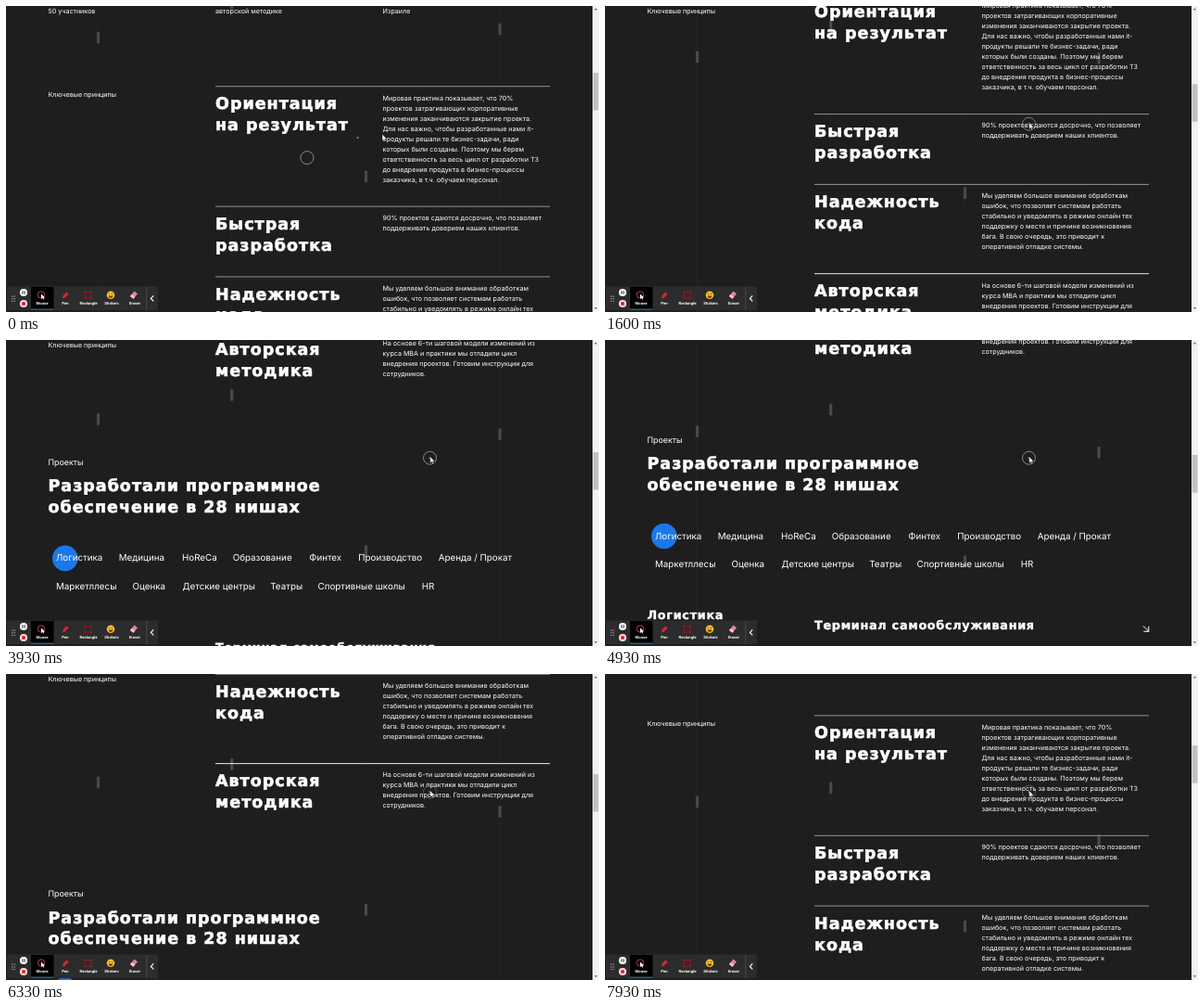
Write an HTML page that moves like this. It is 640 by 330 pixels and loops after 8 s.

```html
<!DOCTYPE html>
<html lang="ru">
<head>
<meta charset="utf-8">
<title>Ключевые принципы</title>
<style>
  html, body { margin: 0; width: 100%; height: 100%; overflow: hidden; background: #1e1e1e; }
  svg { display: block; width: 640px; height: 330px; }
  text { fill: #fff; text-rendering: geometricPrecision; }
  .body { font: 400 7.15px Inter, sans-serif; }
  .label { font: 400 8.9px Inter, sans-serif; }
  .chip { font: 400 9.8px Inter, sans-serif; }
  .title, .sub { font: 700 17.5px "DejaVu Sans", sans-serif; letter-spacing: 1px; stroke: #fff; stroke-width: .6px; }
  .sub { font-size: 12.8px; letter-spacing: .7px; stroke-width: .4px; }
  .tool { font: 700 4.2px Roboto, sans-serif; text-anchor: middle; }
</style>
</head>
<body>
<svg viewBox="0 0 640 330">
  <rect width="640" height="330" fill="#1e1e1e"/>
  <g id="rails"></g>
  <g id="page"></g>
  <text id="sticky" class="body" x="45.5">Ключевые принципы</text>

  <circle id="ring" r="7" fill="none" stroke="#b4b4b4" stroke-width=".7"/>
  <circle id="dot" r="1" fill="#999"/>
  <path id="pointer" d="M0 0V7L1.6 5.5L2.7 8L3.8 7.5L2.7 5.1H4.9Z" fill="#fff" stroke="#111" stroke-width=".4"/>

  <rect x="633" width="7" height="330" fill="#f1f1f1"/>
  <rect id="thumb" x="633.6" width="5.8" height="40.5" fill="#c1c1c1"/>
  <path d="M634.9 4.3L636.5 2.5L638.1 4.3ZM634.9 325.2L636.5 327L638.1 325.2Z" fill="#505050"/>

  <g id="toolbar">
    <rect x="1" y="302.5" width="163" height="25.7" fill="#2c2c2c"/>
    <rect x="27" y="303" width="24.5" height="24.7" fill="#000"/>
    <rect x="27" y="326.6" width="24.5" height="1.1" fill="#2a7fa8"/>
    <path d="M6.8 312.6V320M9.2 312.6V320" stroke="#bbb" stroke-width="1.1" stroke-dasharray="1.1 1.6"/>
    <circle cx="19" cy="309" r="4.1" fill="#fff"/>
    <path d="M17.9 307.3V310.7M20.1 307.3V310.7" stroke="#222" stroke-width="1"/>
    <circle cx="19" cy="321" r="4.1" fill="#f6dcdf"/>
    <rect x="17.2" y="319.2" width="3.6" height="3.6" rx=".5" fill="#e0162b"/>
    <circle cx="38" cy="311.5" r="3.7" fill="none" stroke="#d8455a" stroke-width=".9"/>
    <path d="M38 310.5V316L39.4 314.8L40.3 316.6L41.2 316.2L40.4 314.4H42Z" fill="#fff"/>
    <path d="M61 315.4L61.6 312.6L65.2 308.4L67.6 310.4L64 314.6Z" fill="#e0203a"/>
    <rect x="85.4" y="308.6" width="6.6" height="6.6" fill="none" stroke="#a80f22" stroke-width=".8"/>
    <path d="M84.6 307.8h1.6v1.6h-1.6zM91.2 307.8h1.6v1.6h-1.6zM84.6 314.4h1.6v1.6h-1.6zM91.2 314.4h1.6v1.6h-1.6z" fill="#b51026"/>
    <circle cx="113" cy="311.7" r="4.3" fill="#f6bd32"/>
    <path d="M110.6 312.6H115.4A2.4 2.4 0 0 1 110.6 312.6Z" fill="#6b3a10"/>
    <circle cx="111.5" cy="310.5" r=".6" fill="#6b3a10"/>
    <circle cx="114.5" cy="310.5" r=".6" fill="#6b3a10"/>
    <path d="M134 313L138.6 307.6L142 310.4L137.4 315.8Z" fill="#e58492"/>
    <path d="M134 313L135.8 310.9L139.2 313.7L137.4 315.8Z" fill="#f7c6cc"/>
    <path d="M151.8 303V328" stroke="#555" stroke-width=".7"/>
    <path d="M159.2 312.4L156.4 315.4L159.2 318.4" fill="none" stroke="#fff" stroke-width="1.2"/>
  </g>
</svg>
<script>
const LOOP = 8000;
const el = id => document.getElementById(id);
const text = (cls, x, y, str) => `<text class="${cls}" x="${x}" y="${y}">${str}</text>`;
const lines = (cls, x, y, step, list) => list.map((s, i) => text(cls, x, y + i * step, s)).join('');
const moveTo = (id, x, y) => el(id).setAttribute('transform', `translate(${x} ${y})`);

const sections = [
  { y: 86.7, title: ['Ориентация', 'на результат'], body: [
    'Мировая практика показывает, что 70%', 'проектов затрагивающих корпоративные',
    'изменения заканчиваются закрытие проекта.', 'Для нас важно, чтобы разработанные нами it-',
    'продукты решали те бизнес-задачи, ради', 'которых были созданы. Поэтому мы берем',
    'ответственность за весь цикл от разработки ТЗ', 'до внедрения продукта в бизнес-процессы',
    'заказчика, в т.ч. обучаем персонал.'] },
  { y: 216.2, title: ['Быстрая', 'разработка'], body: [
    '90% проектов сдаются досрочно, что позволяет', 'поддерживать доверием наших клиентов.'] },
  { y: 292, title: ['Надежность', 'кода'], body: [
    'Мы уделяем большое внимание обработкам', 'ошибок, что позволяет системам работать',
    'стабильно и уведомлять в режиме онлайн тех', 'поддержку о месте и причине возникновения',
    'бага. В свою очередь, это приводит к', 'оперативной отладке системы.'] },
  { y: 388.3, title: ['Авторская', 'методика'], bright: true, body: [
    'На основе 6-ти шаговой модели изменений из', 'курса MBA и практики мы отладили цикл',
    'внедрения проектов. Готовим инструкции для', 'сотрудников.'] },
];

const chips = [
  [[54, 'Логистика'], [121.7, 'Медицина'], [190, 'HoReCa'], [244.7, 'Образование'],
   [327.3, 'Финтех'], [380.3, 'Производство'], [466.7, 'Аренда / Прокат']],
  [[54, 'Маркетллесы'], [136.5, 'Оценка'], [190.5, 'Детские центры'], [285.3, 'Театры'],
   [336.5, 'Спортивные школы'], [448.7, 'HR']],
];

el('page').innerHTML =
  text('body', 45.5, 8.3, '50 участников') +
  text('body', 226, 8.3, 'авторской методике') +
  text('body', 406.5, 8.3, 'Израиле') +
  sections.map(s =>
    `<path d="M226 ${s.y}H587" stroke="${s.bright ? '#fff' : '#a0a0a0'}" stroke-width=".9"/>` +
    lines('title', 226, s.y + 24.6, 22.8, s.title) +
    lines('body', 406.5, s.y + 14.8, 11, s.body)).join('') +
  text('label', 45.5, 532, 'Проекты') +
  lines('title', 45.5, 560.2, 22.8, ['Разработали программное', 'обеспечение в 28 нишах']) +
  '<circle cx="63.8" cy="632.5" r="13.8" fill="#1a78ea"/>' +
  chips.map((row, i) => row.map(([x, s]) => text('chip', x, 635.5 + i * 30.4, s)).join('')).join('') +
  text('sub', 45.5, 722.4, 'Логистика') +
  text('sub', 226, 732.8, 'Терминал самообслуживания') +
  '<path d="M580.8 729.3L586.8 735.3M586.8 729.8V735.3H581.3" fill="none" stroke="#fff" stroke-width="1"/>';

// x, starting centre and fall speed in px per second
const drops = [[99.5, 34, 13.1], [243.7, -3, 15.85], [388.5, 184, 11.1], [533, 25, 19.5]];
el('rails').innerHTML =
  drops.map(([x]) => `<path d="M${x} 0V330" stroke="#252525" stroke-width=".8"/>`).join('') +
  drops.map(([x], i) => `<rect id="drop${i}" x="${x - 1.6}" y="-6.2" width="3.2" height="12.4" fill="#4a4a4a"/>`).join('');

el('toolbar').innerHTML += ['Mouse', 'Pen', 'Rectangle', 'Stickers', 'Eraser']
  .map((s, i) => text('tool', 39 + i * 25, 322, s)).join('');

const scrollKeys = [[0, 0], [600, 0], [1600, 99.5], [2730, 191], [3930, 397], [4430, 429],
  [4930, 421], [6330, 291.8], [7930, 42], [8000, 34]];
const ringKeys = [[0, 1], [1600, .9], [2730, .55], [3500, 1], [5300, 1], [6330, .5], [8000, .6]];

function slope(keys, i) {
  if (i === 0 || i === keys.length - 1) return 0;
  const rate = k => (keys[k + 1][1] - keys[k][1]) / (keys[k + 1][0] - keys[k][0]);
  const a = rate(i - 1), b = rate(i);
  return a * b <= 0 ? 0 : 2 * a * b / (a + b);
}

// Monotone cubic through the keys
function sample(keys, t) {
  let i = 0;
  while (i < keys.length - 2 && t >= keys[i + 1][0]) i++;
  const [t0, a] = keys[i], [t1, b] = keys[i + 1];
  const d = t1 - t0, u = (t - t0) / d, v = 1 - u;
  return a * (1 + 2 * u) * v * v + b * u * u * (3 - 2 * u) +
    d * u * v * (slope(keys, i) * v - slope(keys, i + 1) * u);
}

const follow = (from, to, t, lag) => to + (from - to) * Math.exp(-t / lag);

function draw(t) {
  const scroll = sample(scrollKeys, t);
  moveTo('page', 0, -scroll);
  el('sticky').setAttribute('y', Math.min(Math.max(97.7 - scroll, 7.8), 405 - scroll));
  el('thumb').setAttribute('y', 72 + scroll * .1235);
  drops.forEach(([, y, speed], i) => moveTo('drop' + i, 0, y + speed * t / 1000));
  moveTo('pointer', follow(405.5, 457.8, t, 90), follow(138.5, 125.8, t, 90));
  moveTo('dot', follow(379, 457.5, t, 120), follow(142, 127.2, t, 120));
  moveTo('ring', follow(324.3, 457.5, t, 200), follow(163.8, 127.2, t, 200));
  el('ring').setAttribute('opacity', sample(ringKeys, t));
}

const start = performance.now();
function tick() {
  draw((performance.now() - start) % LOOP);
  requestAnimationFrame(tick);
}
tick();
</script>
</body>
</html>
```
